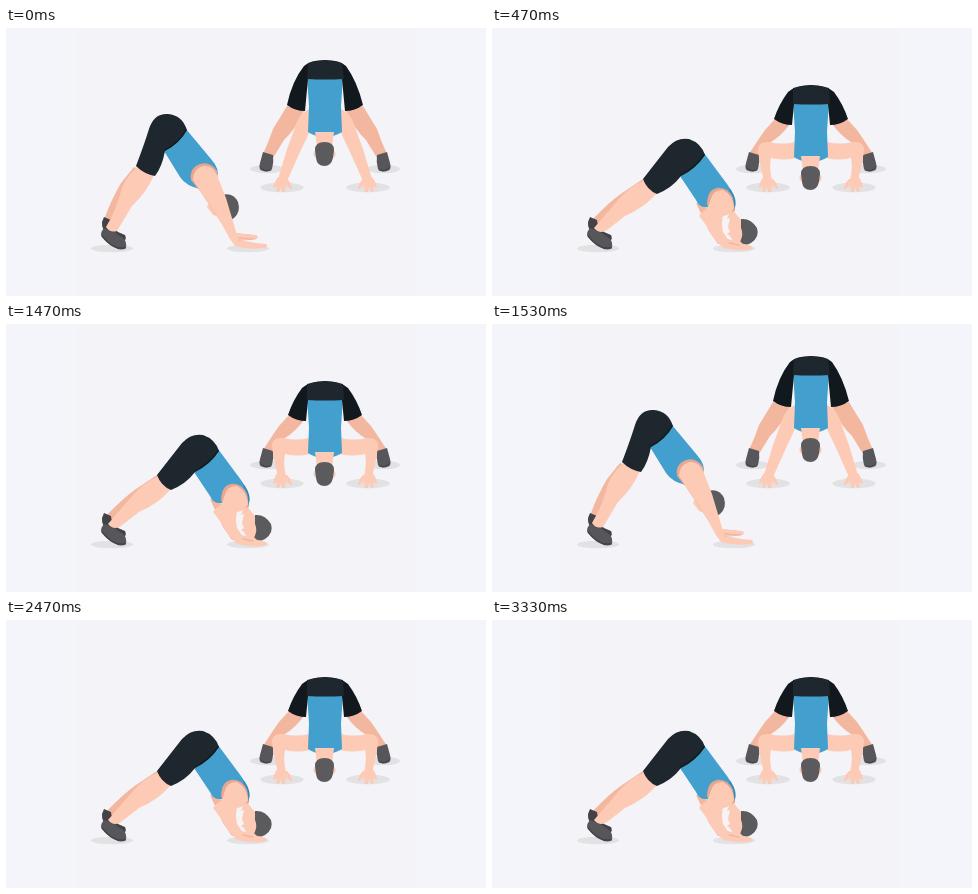
Animation of 480 by 268 pixels, one loop 3390 ms. Source, as an HTML page with a canvas:

```html
<!DOCTYPE html>
<html lang="en">
<head>
<meta charset="utf-8">
<title>Exercise loop</title>
<style>
html, body { margin: 0; width: 100%; height: 100%; overflow: hidden; background: #f3f5fb; }
canvas { display: block; width: 480px; height: 268px; }
</style>
</head>
<body>
<canvas id="stage"></canvas>
<script>
const canvas = document.getElementById('stage');
const ctx = canvas.getContext('2d');
const ratio = window.devicePixelRatio || 1;
canvas.width = 480 * ratio;
canvas.height = 268 * ratio;

const LOOP = 3390;
const SWITCHES = [470, 1530, 2470];
const SKIN = '#fdcbb5', SKIN_FAR = '#f3b79f', SHADE = '#e7a68e';
const BLUE = '#439fce', BLUE_DARK = '#3287b5';
const DARK = '#1d272d', BLACK = '#12191e';
const HAIR = '#5b5a5d', SHOE = '#57565a', SOLE = '#434247';
const PANEL = '#f4f4f8', SHADOW = '#e2e2e5';

function shape(color, d) {
  ctx.fillStyle = color;
  ctx.fill(new Path2D(d));
}

function line(color, width, d) {
  ctx.strokeStyle = color;
  ctx.lineWidth = width;
  ctx.lineCap = ctx.lineJoin = 'round';
  ctx.stroke(new Path2D(d));
}

function oval(color, x, y, rx, ry, turn = 0) {
  ctx.fillStyle = color;
  ctx.beginPath();
  ctx.ellipse(x, y, rx, ry, turn, 0, Math.PI * 2);
  ctx.fill();
}

// Draws a half figure and its reflection about the front figure's axis.
function mirrored(draw) {
  draw();
  ctx.save();
  ctx.translate(638, 0);
  ctx.scale(-1, 1);
  draw();
  ctx.restore();
}

function backdrop() {
  ctx.fillStyle = '#f3f5fb';
  ctx.fillRect(0, 0, 480, 268);
  ctx.fillStyle = PANEL;
  ctx.fillRect(70, 0, 338, 268);
  oval(SHADOW, 106, 220.5, 21, 3.8);
  oval(SHADOW, 242, 220.5, 21, 3.8);
  mirrored(() => {
    oval(SHADOW, 261, 141, 17, 4.2);
    oval(SHADOW, 276, 159.5, 21.5, 5);
  });
}

function sideShoes() {
  shape(SOLE, 'M98 189 L105 192 Q105 198 112 204 L119 207 Q121 211 118 213 L105 210 Q95 203 96 194 Z');
  shape(SHOE, 'M99 200 Q102 203 106 201 Q110 206 117 210 Q121 213 120 220 Q115 223 110 220 Q100 215 95 207 Q95 202 99 200 Z');
  line(SOLE, 1.4, 'M96 208 Q104 218 112 220 L119 220');
}

function sideUp() {
  shape(SKIN_FAR, 'M128 139 L142 146 Q132 167 107 196 L98 192 Q104 174 115 155 Z');
  sideShoes();
  shape(SKIN, 'M131 139 L148 147 Q141 164 126 178 L111 203 Q104 205 100 199 Q109 184 114 167 Q116 153 131 139 Z');

  shape(SKIN, 'M201 179 L207 187 L221 192 L225 172 L208 165 Z');
  shape(HAIR, 'M216 167 Q227 164 232 174 Q235 184 228 190 Q223 194 219 189 Z');
  shape(SKIN_FAR, 'M190 157 L205 170 L229 205 L249 207 Q253 209 249 211 L226 211 Z');

  shape(BLUE, 'M180 101 L205 131 Q214 141 211 149 L194 161 Q180 158 174 149 L158 123 Z');
  shape(DARK, 'M130 138 Q138 117 143 101 Q148 85 162 86 Q176 87 181 102 Q174 115 159 123 Q156 139 149 148 Q138 146 130 138 Z');
  line(BLACK, 1.2, 'M180 102 Q173 115 159 122');
  shape(SHADE, 'M185 152 Q183 140 194 136 Q204 133 211 143 L212 151 L192 161 Z');
  shape(SKIN, 'M187 152 Q187 141 197 138 Q207 137 211 147 L220 170 L231 207 L234 212 Q247 215 260 216 Q263 219 258 220 Q242 222 229 218 L224 211 L210 186 Z');
  line(SKIN, 3.6, 'M229 207 Q240 208 250 209');
  line(SHADE, 0.8, 'M233 212 Q241 212 249 211');
}

function sideDown() {
  shape(SKIN_FAR, 'M151 151 L163 161 Q140 181 108 199 L99 193 Q117 174 130 165 Z');
  sideShoes();
  shape(SKIN, 'M151 153 L165 165 Q152 180 133 188 L115 202 Q108 207 102 200 Q115 185 126 172 Q137 159 151 153 Z');

  shape(SKIN_FAR, 'M204 175 L214 178 L226 204 L236 215 L226 216 L217 203 Z');
  shape(SKIN, 'M239 180 L249 192 L257 206 L251 215 L242 214 L237 207 L232 205 L235 191 Z');
  shape('#f8f4f4', 'M232 192 L238 190 L236 199 L238 204 L232 208 Z');
  shape(HAIR, 'M249 191 Q259 190 265 200 Q268 209 259 215 Q253 219 248 214 Q252 206 249 200 Z');

  shape(BLUE, 'M212 125 L235 156 Q245 169 243 180 L234 186 L215 179 Q207 180 204 172 L188 148 Z');
  shape(DARK, 'M151 151 Q165 133 176 119 Q185 109 197 111 Q209 115 213 127 Q204 141 189 148 Q180 160 165 166 Q155 162 151 151 Z');
  line(BLACK, 1.2, 'M212 127 Q203 140 189 147');
  line(BLUE_DARK, 1.5, 'M238 162 Q245 172 242 181');
  shape(SHADE, 'M215 177 Q215 162 225 160 Q235 158 241 170 L243 183 L232 186 Z');
  shape(SKIN, 'M210 184 Q216 182 218 173 Q221 161 231 162 Q241 167 242 180 Q239 187 231 188 Q229 195 231 204 L237 213 Q250 215 260 218 Q262 221 256 222 Q240 223 230 219 L221 209 Q214 196 207 188 Z');
  line(SKIN, 3, 'M232 212 L248 215');
  line(SHADE, 0.8, 'M237 215 L247 217');
}

function frontFoot() {
  shape(SHOE, 'M257 124 L267 127 Q268 134 266 141 Q263 145 257 143 Q252 142 254 135 Z');
  line(SOLE, 1, 'M254 139 Q258 144 265 142');
}

function frontHand(wristX) {
  shape(SKIN, `M${wristX} 149 L281 151 Q286 156 286 161 Q283 161 280 157 L279 164 L276 164 L275 159 L273 164 L270 163 L271 158 L267 160 Q267 156 ${wristX} 149 Z`);
}

function frontHead(y) {
  shape(SKIN, `M309 ${y - 10} L328 ${y - 10} L326 ${y + 5} L311 ${y + 5} Z`);
  oval(SKIN, 309, y + 12, 1.5, 3);
  oval(SKIN, 328, y + 12, 1.5, 3);
  shape(HAIR, `M309 ${y + 8} Q309 ${y} 318.5 ${y} Q328 ${y} 328 ${y + 8} L327 ${y + 16} Q325 ${y + 24} 318.5 ${y + 24} Q311 ${y + 24} 310 ${y + 16} Z`);
}

function frontUp() {
  mirrored(() => {
    shape(SKIN_FAR, 'M281 78 L298 83 Q289 102 278 112 L267 130 L257 126 Q263 113 267 101 Z');
    frontFoot();
    shape(SKIN, 'M303 81 Q294 85 290 96 Q286 108 281 121 L272 151 L281 153 L294 124 L303 105 Z');
    frontHand(272);
  });
  shape(BLUE, 'M301 49 L337 49 L335 78 L336 104 Q328 109 319 109 Q309 109 302 104 L303 78 Z');
  shape(BLACK, 'M298 38 Q304 32 319 32 Q334 32 340 38 Q351 53 357 77 Q349 83 339 83 L336 51 L302 51 L299 83 Q289 83 281 77 Q286 53 298 38 Z');
  shape(DARK, 'M302 35 Q319 30 336 35 L338 51 Q319 52 301 51 Z');
  frontHead(114);
}

function frontDown() {
  mirrored(() => {
    shape(SKIN_FAR, 'M283 91 L298 96 Q289 108 279 114 L267 130 L257 126 Q266 112 273 102 Z');
    frontFoot();
    shape(SKIN, 'M304 114 Q289 117 277 114 Q266 113 266 122 Q268 139 272 152 L280 153 Q277 139 279 130 Q292 133 304 130 Z');
    frontHand(271);
  });
  shape(BLUE, 'M301 74 L337 74 L335 103 L336 129 Q328 134 319 134 Q309 134 302 129 L303 103 Z');
  shape(BLACK, 'M296 64 Q304 57 319 57 Q334 57 342 64 Q351 76 356 91 Q348 97 338 97 L336 76 L302 76 L300 97 Q290 97 282 91 Q287 76 296 64 Z');
  shape(DARK, 'M301 60 Q319 55 337 60 L338 76 Q319 77 301 76 Z');
  frontHead(138);
}

function frame(now) {
  const t = now % LOOP;
  const lowered = SWITCHES.filter(s => t >= s).length % 2 === 1;
  ctx.setTransform(ratio, 0, 0, ratio, 0, 0);
  backdrop();
  if (lowered) {
    sideDown();
    frontDown();
  } else {
    sideUp();
    frontUp();
  }
}

const start = performance.now();
function tick() {
  frame(performance.now() - start);
  requestAnimationFrame(tick);
}
tick();
</script>
</body>
</html>
```
